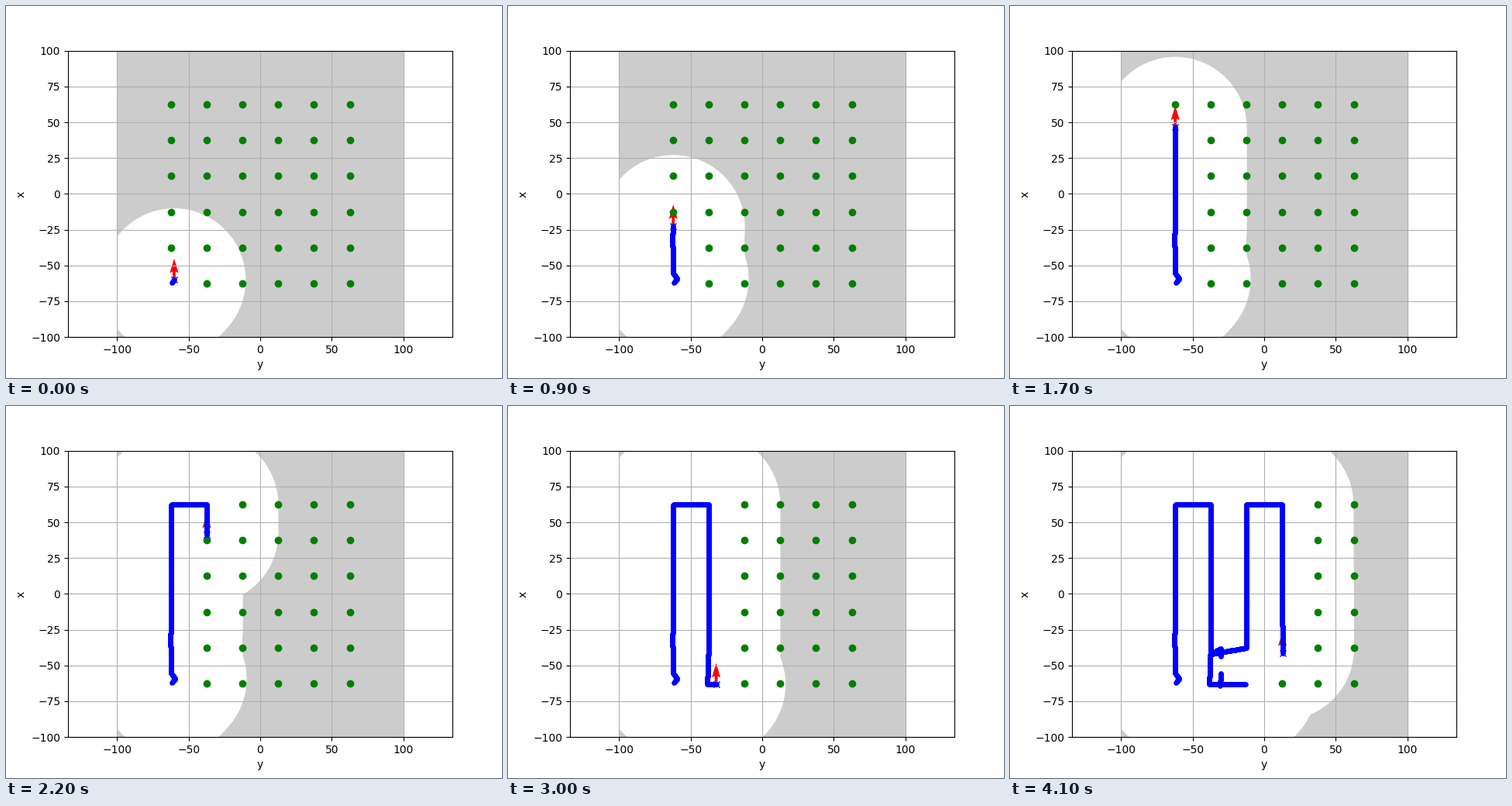
A matplotlib script that plays this animation: 640x480 px, repeating every 4.2 s.

```python
import numpy as np
import matplotlib.pyplot as plt
from matplotlib.animation import FuncAnimation
from matplotlib.patches import Rectangle

FRAMES, INTERVAL = 42, 100
SIGHT = 50          # sensing radius
LANE = 25           # distance between lanes and between goals
TOP = 62.5
STEP = 0.5          # distance between trail dots
LAG = 0.1           # the map trails the robot by this many frames


def hairpin(x):
    """Turn at the top of a lane into the next one."""
    return [(x, TOP), (x + LANE - 0.2, TOP)]


def trace(points):
    """Evenly spaced positions along a polyline."""
    p = np.array(points)
    d = np.append(0, np.cumsum(np.hypot(*np.diff(p, axis=0).T)))
    s = np.arange(0, d[-1], STEP)
    return np.column_stack([np.interp(s, d, p[:, k]) for k in (0, 1)])


# The robot jumps from the end of one leg to the start of the next.
start = [(-61.7, -62), (-59.4, -59.3), (-62.1, -55.5), (-62.2, -39),
         (-62.7, -36), (-62.7, -28), (-62.1, -26)]
corner = [(-37.3, -41.5), (-38, -43.5), (-38.2, -63.2), (-13, -63.2)]
spur = [(-30.7, -64.3), (-30.4, -55)]
detour = [(-30.3, -43.5), (-30.3, -38), (-37, -42), (-12.4, -37.7)]
legs = [start + hairpin(-62.1) + corner,
        spur,
        detour + hairpin(-12.4) + [(12.8, -45)]]
trail = np.vstack([trace(leg) for leg in legs])


def travelled(t):
    """Number of trail positions passed; the robot speeds up over the run."""
    distance = np.interp(t, [0, 6, 12, 18, 22, 24, 30, 36, 41],
                         [2.6, 26, 57, 121, 172.5, 194, 283, 418, 579])
    return int(round(distance / STEP)) + 1


# Each goal disappears once the robot passes close to it.
ticks = np.arange(-TOP, TOP + 1, LANE)
goals = np.array([(x, y) for x in ticks for y in ticks])
near = np.linalg.norm(goals[:, None] - trail, axis=2) < 2
reached = np.where(near.any(axis=1), near.argmax(axis=1), len(trail))

fig, ax = plt.subplots(figsize=(6.4, 4.8), dpi=100)
scale = 480 * 0.77 / 200          # pixels per unit
half = 640 * 0.775 / scale / 2
ax.set(xlim=(-half, half), ylim=(-100, 100), xlabel="y", ylabel="x",
       xticks=range(-100, 101, 50), yticks=range(-100, 101, 25))
ax.grid(True)

ax.add_patch(Rectangle((-100, -100), 200, 200, fc="0.8", ec="none", zorder=0))
seen, = ax.plot([], [], color="white", lw=2 * SIGHT * scale * 72 / 100,
                solid_capstyle="round", solid_joinstyle="round", zorder=0.5)
arrow = ax.quiver([-60], [-60], [0], [1], color="red")
goal_dots, = ax.plot([], [], "go")
trail_dots, = ax.plot([], [], "b.", markersize=7.5)
robot, = ax.plot([], [], "bx")


def draw(i):
    n = travelled(i)
    here = trail[n - 1:n]
    seen.set_data(*trail[:travelled(i - LAG)].T)
    trail_dots.set_data(*trail[:n].T)
    goal_dots.set_data(*goals[reached >= n].T)
    robot.set_data(*here.T)
    arrow.set_offsets(here)
    return seen, arrow, goal_dots, trail_dots, robot


anim = FuncAnimation(fig, draw, frames=FRAMES, interval=INTERVAL,
                     init_func=lambda: draw(0), repeat=True, repeat_delay=0)
plt.show()
```
